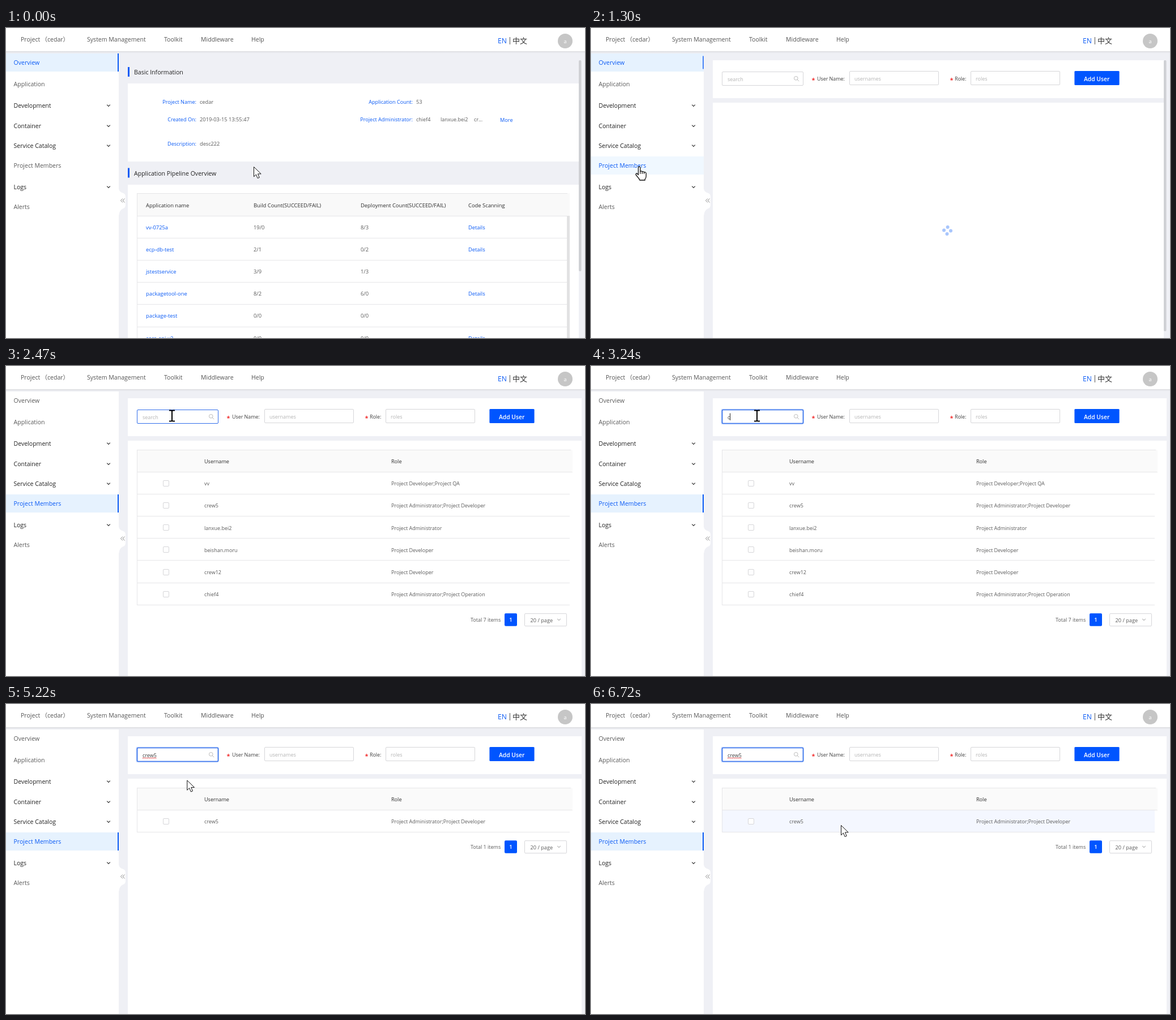
An HTML page for the animation above (6940 ms loop, 1022 px wide and 548 px high).

```html
<!DOCTYPE html>
<html lang="zh-CN">
<head>
<meta charset="utf-8">
<title>Project members</title>
<style>
  html, body { margin: 0; width: 100%; height: 100%; overflow: hidden; background: #eff0f5; }
  svg { display: block; width: 1022px; height: 548px; }
  text { font-family: "Open Sans", "Noto Sans", "Noto Sans CJK SC", "Noto Sans CJK", sans-serif; white-space: pre; }
  .bar { transform-box: fill-box; transform-origin: center; }
</style>
</head>
<body>
<svg id="stage" viewBox="0 0 1022 548" xmlns="http://www.w3.org/2000/svg"></svg>
<script>
const LOOP = 6940;
const BLUE = '#0a5af5', GREY = '#5a5a5a', DARK = '#222', LINE = '#e6e6e8', HINT = '#b4b4b4';
const BIG = 10.55, SMALL = 9;

// Markup helpers; text is placed by its left edge and the middle of its capitals.
const text = (x, mid, str, fill = GREY, size = SMALL, extra = '') =>
  `<text x="${x}" y="${Math.round(mid + size * 0.39)}" font-size="${size}" fill="${fill}" ${extra}>${str}</text>`;
const rect = (x, y, x2, y2, fill, extra = '') =>
  `<rect x="${x}" y="${y}" width="${x2 - x}" height="${y2 - y}" fill="${fill}" ${extra}/>`;
const box = (x, y, x2, y2, extra = '') =>
  rect(x + .5, y + .5, x2 - .5, y2 - .5, '#fff', `stroke="#d6d6d9" rx="1.5" ${extra}`);
const path = (d, stroke, width = 1, extra = '') =>
  `<path d="${d}" fill="none" stroke="${stroke}" stroke-width="${width}" ${extra}/>`;
const group = (id, body, extra = '') => `<g id="${id}" ${extra}>${body}</g>`;
const chevron = (x, y, color, w = 2.8) => path(`M${x - w},${y - w / 2}l${w},${w}l${w},${-w}`, color, 1.2);
const rowLine = (y, x2) => path(`M231,${Math.round(y) - .5}H${x2}`, LINE);

function header() {
  const nav = [[26, 'Project'], [62.5, '（cedar）'], [143, 'System Management'], [279, 'Toolkit'],
    [344, 'Middleware'], [433, 'Help']];
  return rect(0, 0, 1022, 45, 'url(#shade)') + rect(0, 0, 1022, 41, '#fff') +
    path('M0,41.5H1022', '#dcdde0') +
    nav.map(([x, s]) => text(x, 20, s, '#555', BIG)).join('') +
    text(868, 22, 'EN', BLUE, 12.2) + text(886, 21.5, '|', '#333', 12.2) +
    text(894, 22, '中文', '#333', 13) +
    '<circle cx="987" cy="23" r="13" fill="#c6c6c6"/>' +
    text(987, 23.5, 'a', '#fff', SMALL, 'text-anchor="middle"');
}

function sidebar() {
  const groups = [[137, 'Development'], [173, 'Container'], [208, 'Service Catalog'], [281, 'Logs']];
  const mark = (id, y) => rect(0, y, 199, y + 32, '#e6f2fe', `id="${id}Back"`) +
    rect(197, y, 199, y + 32, BLUE, `id="${id}Bar" class="bar"`);
  return rect(0, 45, 199, 548, '#fff') +
    '<path d="M199,284Q200,290 206,291.5Q211,293 211,298V313Q211,318 206,319.5Q200,322 199,332Z" fill="#fff"/>' +
    path('M206,301.5l-3.5,3.5l3.5,3.5M209.5,301.5l-3.5,3.5l3.5,3.5', '#888') +
    rect(0, 227, 199, 259, '#f0f8ff', 'id="hover"') +
    mark('top', 45) + mark('members', 227) +
    text(13.5, 61, 'Overview', BLUE, BIG, 'id="itemTop"') +
    text(13.5, 99, 'Application', GREY, BIG) +
    text(13.5, 243, 'Project Members', GREY, BIG, 'id="itemMembers"') +
    text(13.5, 316, 'Alerts', GREY, BIG) +
    groups.map(([y, s]) => text(13.5, y, s, DARK, BIG) + chevron(181, y, '#333')).join('');
}

function overview() {
  const title = (y, s) => rect(215, y - 9, 218, y + 8, BLUE) + text(226, y, s, DARK, BIG);
  const label = (x, y, s) => text(x, y, s + ':', BLUE, 9.1, 'text-anchor="end"');
  const heads = [[247, 'Application name'], [437, 'Build Count(SUCCEED/FAIL)'],
    [626, 'Deployment Count(SUCCEED/FAIL)'], [816, 'Code Scanning']];
  const rows = [['vv-0725a', '19/0', '8/3', 1], ['ecp-db-test', '2/1', '0/2', 1], ['jstestservice', '3/9', '1/3', 0],
    ['packagetool-one', '8/2', '6/0', 1], ['package-test', '0/0', '0/0', 0], ['core-api-v2', '0/0', '0/0', 1]];
  return title(78, 'Basic Information') + rect(215, 98, 1011, 236, '#fff') +
    label(336, 130, 'Project Name') + text(342, 130, 'cedar', GREY, 9.2) +
    label(336, 161, 'Created On') + text(342, 161, '2019-03-15 13:55:47', GREY, 9.3) +
    label(336, 204, 'Description') + text(342, 204, 'desc222', GREY, 9.2) +
    label(718, 130, 'Application Count') + text(724, 130, '53', GREY, 9.2) +
    label(718, 161, 'Project Administrator') + text(724, 161, 'chief4') +
    text(767, 161, 'lanxue.bei2') + text(826, 161, 'cr...') + text(872, 162.5, 'More', BLUE, 9.2) +
    title(256.5, 'Application Pipeline Overview') + rect(215, 277, 1011, 548, '#fff') +
    rect(231, 292, 995, 332, '#f9f9f9') + rowLine(293, 991) + path('M231.5,292V548', LINE) +
    heads.map(([x, s]) => text(x, 313, s, '#2c2c2c', 9.4)).join('') +
    rows.map(([name, build, deploy, more], i) => {
      const y = 352 + 39.2 * i;
      return rowLine(y - 19.5, 990) + text(247, y, name, BLUE, 9.4) + text(437, y, build, GREY, 9.3) +
        text(626, y, deploy, GREY, 9.3) + (more ? text(816, y, 'Details', BLUE, 9.3) : '');
    }).join('') +
    rect(990, 332, 995, 548, '#e2e2e3') + rect(1011, 57, 1015.5, 430, '#cfd0d4', 'rx="2"');
}

function form() {
  const star = x => text(x, 91.5, '*', '#f01818', 11, 'font-weight="600"');
  return rect(215, 57, 1016, 124, '#fff') + rect(215, 132, 1016, 548, '#fff') +
    rect(229.5, 75.5, 375.5, 103.5, '#d5e3fd', 'rx="2" id="glow"') + box(231, 77, 375, 102, 'id="search"') +
    '<circle cx="361.8" cy="88.8" r="3.3" fill="none" stroke="#bbb"/>' + path('M364.2,91.2l3,3', '#bbb') +
    text(241, 90, 'search', HINT, SMALL, 'id="query"') +
    path('', '#e02020', 1, 'id="wavy" stroke-dasharray="2 .7"') + rect(0, 83.5, 1, 96, '#222', 'id="caret"') +
    star(389.5) + text(399, 89.5, 'User Name:', '#3c3c3c', 8.9) + box(456, 76, 614, 101) + text(465, 89.5, 'usernames', HINT) +
    star(633.5) + text(642, 89.5, 'Role:', '#3c3c3c', 8.9) + box(670, 76, 828, 101) + text(679, 89.5, 'roles', HINT) +
    rect(853.4, 76, 932.6, 101, '#0055ff', 'rx="1.5"') + text(870, 89.5, 'Add User', '#fff', 10.3, 'font-weight="600"');
}

function members(rows, total, hoverId) {
  const end = 187 + 39.2 * rows.length, mid = end + 26;
  return rect(231, 148, 1000, 187, '#fafafa', 'rx="3"') + rowLine(149, 997) +
    text(350, 168.5, 'Username', '#2c2c2c', 9.1) + text(680, 168.5, 'Role', '#2c2c2c', 9.1) +
    (hoverId ? rect(231, 187, 995, 226, '#f4f7ff', `id="${hoverId}"`) : '') +
    path(`M231.5,148V${end}`, LINE) + rowLine(187.5, 1000) +
    rows.map(([name, role], i) => {
      const y = 207.7 + 39.2 * i;
      return box(277, Math.round(y) - 6, 288, Math.round(y) + 5) + text(350, y, name) + text(680, y, role) + rowLine(y + 19, 995);
    }).join('') +
    text(820, mid, `Total ${total} items`) + rect(880, mid - 11, 902, mid + 11.5, '#0055ff', 'rx="2"') +
    text(891, mid + .5, '1', '#fff', 9.5, 'text-anchor="middle" font-weight="600"') +
    box(915, mid - 11, 990, mid + 12) + text(925.5, mid + 1.5, '20 / page', GREY, 9.2) + chevron(976, mid, '#bbb');
}

const ROLE = 'Project Administrator', DEV = 'Project Developer';
const found = ['crew5', `${ROLE};${DEV}`];
const people = [['vv', `${DEV};Project QA`], found, ['lanxue.bei2', ROLE], ['beishan.moru', DEV],
  ['crew12', DEV], ['chief4', `${ROLE};Project Operation`]];

const spinner = [0, 90, 180, 270].map(a =>
  `<circle cy="-6" r="3" fill="#a9c6fc" transform="rotate(${a})"/>`).join('');
const ink = 'fill="#fff" stroke="#111" stroke-linejoin="round"';
const pointers = {
  arrow: `<path d="M.5,.5V17.8L4.4,14L7.2,20.6L10.2,19.3L7.5,12.9H13.2Z" ${ink}/>`,
  hand: `<path d="M-2.5,14.5V2Q-2.5,0 -.8,0T1,2V8.5Q3,7 4.4,9Q6.4,8 7.6,10Q10.5,9 11.3,12V17Q11.3,20 9.3,22V24H0Q-1,21 -4,18L-6.8,14.5Q-7,11.8 -5,12Z" ${ink} stroke-width="1.3"/>` +
    path('M1,8.5V13M4.4,9V13M7.6,10V13', '#111', 1.2),
  beam: path('M-5,-9.5H-2Q0,-9.5 0,-8Q0,-9.5 2,-9.5H5M0,-8V8M-5,9.5H-2Q0,9.5 0,8Q0,9.5 2,9.5H5', '#000', 2)
};

const stage = document.getElementById('stage');
stage.innerHTML =
  '<defs><linearGradient id="shade" x2="0" y2="1"><stop offset=".91" stop-color="#dfe0e4"/><stop offset="1" stop-color="#eff0f5"/></linearGradient></defs>' +
  rect(0, 0, 1022, 548, '#eff0f5') + header() + sidebar() +
  group('overview', overview()) + group('form', form()) +
  group('all', members(people, 7)) + group('one', members([found], 1, 'rowHover')) +
  group('loading', rect(1011, 57, 1016, 548, '#eff0f5') + rect(1011, 57, 1015.5, 536, '#cfd0d4', 'rx="2"') + group('spin', spinner)) +
  group('pointer', Object.entries(pointers).map(([id, art]) => group(id, art)).join(''));

const el = id => document.getElementById(id);
const show = (id, on) => el(id).setAttribute('visibility', on ? 'inherit' : 'hidden');
const set = (id, attrs) => { for (const k in attrs) el(id).setAttribute(k, attrs[k]); };
const ramp = (t, a, b) => Math.min(1, Math.max(0, (t - a) / (b - a)));
const mix = (a, b, p) => `rgb(${a.map((v, i) => Math.round(v + (b[i] - v) * p))})`;
const GREY_RGB = [90, 90, 90], BLUE_RGB = [10, 90, 245], EDGE_RGB = [214, 214, 217];

// Pointer moves: start, end, step count, then points as [progress, x, y].
const moves = [
  [280, 910, 9, [[0, 437, 245], [.25, 350, 268], [.5, 250, 278], [.75, 150, 262], [1, 86, 245]]],
  [1710, 2400, 10, [[0, 86, 245], [.2, 152, 198], [.4, 229, 134], [.6, 268, 104], [.8, 288, 90], [1, 292, 88]]],
  [2470, 2470, 1, [[0, 292, 88], [1, 293, 88]]],
  [5050, 5610, 8, [[0, 293, 88], [.5, 328, 150], [1, 373, 202]]],
  [5790, 6250, 7, [[0, 373, 202], [3 / 7, 403, 206], [1, 441, 216]]],
  [6620, 6720, 2, [[0, 441, 216], [1, 441, 214]]]
];

function pointerAt(t) {
  const [a, b, n, pts] = moves.filter(m => m[0] <= t).pop() || moves[0];
  const gap = (b - a) / (n - 1 || 1) || 1;
  const p = t < a ? 0 : Math.min(n, Math.floor((t - a) / gap + .06) + 1) / n;
  const i = Math.max(1, pts.findIndex(q => q[0] >= p - 1e-6));
  const [u, x, y] = pts[i - 1], [v, x2, y2] = pts[i], k = (p - u) / (v - u);
  return [x + (x2 - x) * k, y + (y2 - y) * k];
}

function setBar(id, size) {
  el(id).style.transform = `scaleY(${size})`;
  el(id).style.opacity = size;
}

const keyTimes = [3240, 3420, 3570, 3650, 4030];

function draw(t) {
  const onForm = t >= 1080, result = t >= 4750;
  const busy = (onForm && t < 1530) || (t >= 4590 && !result);
  show('overview', !onForm);
  show('form', onForm);
  show('all', t >= 1530 && t < 4590);
  show('one', result);
  show('loading', busy);
  const turn = t < 2000 ? 29 + .3 * (t - 1080) : 18 + .3 * (t - 4590);
  set('spin', { transform: `translate(629 358) rotate(${turn})` });

  const [x, y] = pointerAt(t);
  const overItem = x < 199 && y > 227 && y < 259;
  const overSearch = onForm && x > 231 && x < 375 && y > 77 && y < 102;
  set('pointer', { transform: `translate(${x} ${y})` });
  show('hand', overItem);
  show('beam', overSearch);
  show('arrow', !overItem && !overSearch);

  const picked = ramp(t, 1300, 1590);
  show('hover', overItem);
  set('topBack', { opacity: 1 - picked });
  set('membersBack', { opacity: picked });
  setBar('topBar', 1 - ramp(t, 1250, 1430));
  setBar('membersBar', ramp(t, 1300, 1480));
  set('itemTop', { fill: mix(BLUE_RGB, GREY_RGB, picked) });
  set('itemMembers', { fill: overItem || picked ? BLUE : GREY });
  show('rowHover', result && y > 187 && y < 226);

  const focus = ramp(t, 2640, 2860);
  const edge = Math.max(focus, overSearch ? ramp(t, 2170, 2400) : 0);
  set('glow', { opacity: focus });
  set('search', { stroke: mix(EDGE_RGB, [50, 110, 235], edge), 'stroke-width': 1 + .7 * focus });

  const typed = found[0].slice(0, keyTimes.filter(k => k <= t).length);
  const query = el('query');
  query.textContent = typed || 'search';
  query.setAttribute('fill', typed ? '#3c3c3c' : HINT);
  const end = 241 + query.getComputedTextLength();
  set('caret', { x: Math.round(end) });
  show('caret', (t >= 3240 && t < 4590) || (t >= 6090 && t < 6620));
  set('wavy', { d: `M241,95.5H${end}` });
  show('wavy', t >= 5050);
}

const start = performance.now();
function tick() {
  draw((performance.now() - start) % LOOP);
  requestAnimationFrame(tick);
}
tick();
</script>
</body>
</html>
```
